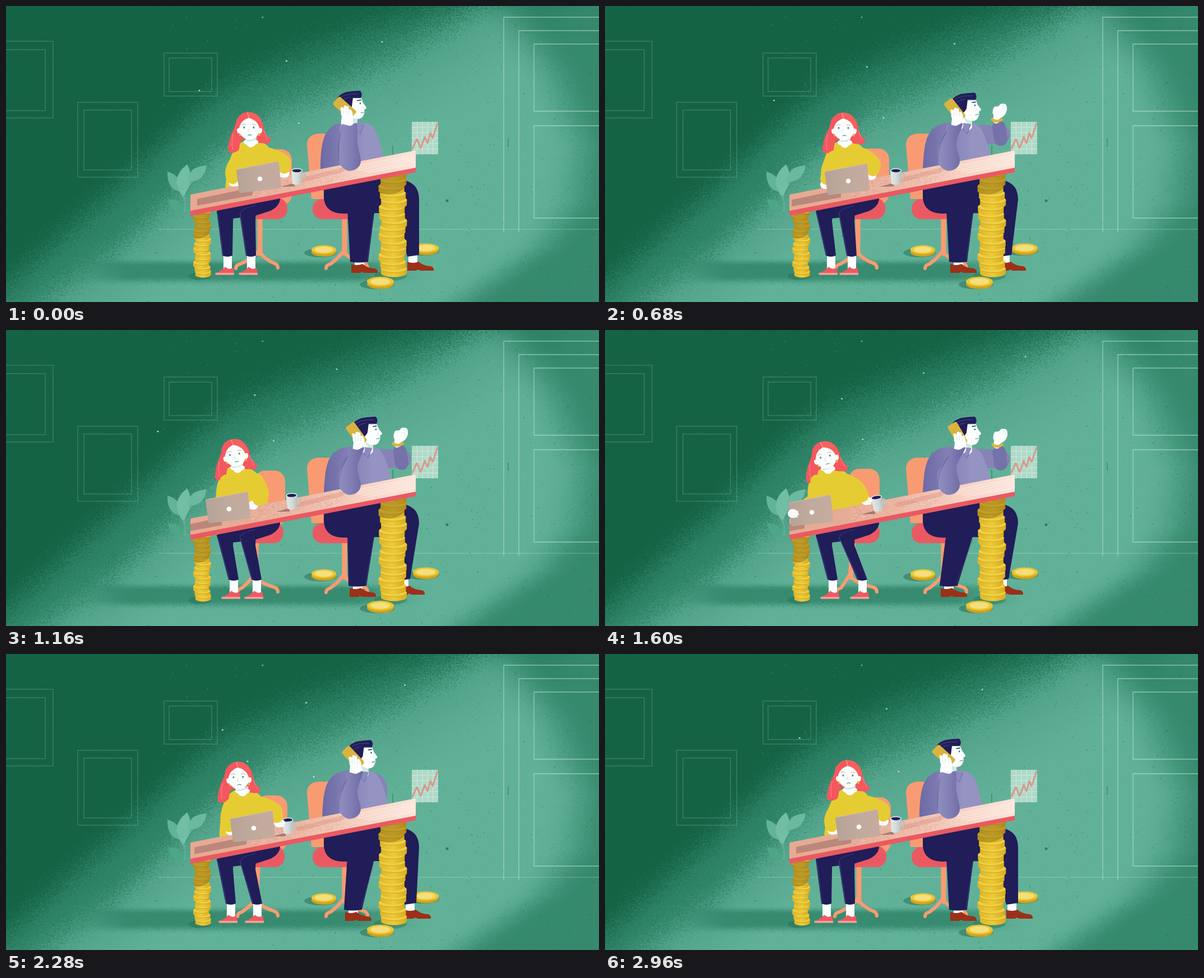
Recreate the animation shown at these times as an HTML page with a canvas. Size 1058 px wide and 529 px high, loop 3 s.

```html
<!DOCTYPE html>
<html lang="en">
<head>
<meta charset="utf-8">
<title>Tilted desk</title>
<style>
html, body { margin: 0; width: 100%; height: 100%; overflow: hidden; background: #2e8266; }
canvas { display: block; width: 100vw; height: 100vh; }
</style>
</head>
<body>
<canvas id="stage" width="1058" height="529"></canvas>
<script>
const W = 1058, H = 529, LOOP = 3000, STEP = 40;
const stage = document.getElementById('stage').getContext('2d');
let c = stage;

const NAVY = '#201d59', ORANGE = '#f99b72', RED = '#ea5962', HAIR = '#f4575f',
  YELLOW = '#e6cc33', WHITE = '#fcfefe', SKIN_SHADE = '#cfeae4';

let seed = 7;
const rand = () => (seed = (seed * 16807) % 2147483647) / 2147483647;
const noise = () => rand() + rand() - 1;
const mix = (a, b, k) => a + (b - a) * k;
const smooth = (a, b, v) => {
  const k = Math.min(1, Math.max(0, (v - a) / (b - a)));
  return k * k * (3 - 2 * k);
};
// Piecewise linear curve; each row is [input, output...]
const along = (rows, v, col = 1) => {
  let i = 1;
  while (i < rows.length - 1 && v > rows[i][0]) i++;
  const [a, b] = [rows[i - 1], rows[i]];
  return mix(a[col], b[col], (v - a[0]) / (b[0] - a[0]));
};

// ---- drawing helpers ----
function fill(color) { c.fillStyle = color; c.fill(); }
function shape(d, color) { c.fillStyle = color; c.fill(new Path2D(d)); }
function line(d, color, width = 1) {
  c.strokeStyle = color; c.lineWidth = width;
  c.lineCap = c.lineJoin = 'round';
  c.stroke(new Path2D(d));
}
function oval(x, y, rx, ry, color, angle = 0) {
  c.beginPath(); c.ellipse(x, y, rx, ry, angle, 0, 7); fill(color);
}
function box(x, y, w, h, r, color) {
  c.beginPath(); c.roundRect(x, y, w, h, r); fill(color);
}
function blob(p, color) {
  const n = p.length, at = i => p[(i + n) % n];
  c.beginPath(); c.moveTo(...p[0]);
  for (let i = 0; i < n; i++) {
    const [a, b, d, e] = [at(i - 1), at(i), at(i + 1), at(i + 2)];
    c.bezierCurveTo(b[0] + (d[0] - a[0]) / 6, b[1] + (d[1] - a[1]) / 6,
      d[0] - (e[0] - b[0]) / 6, d[1] - (e[1] - b[1]) / 6, d[0], d[1]);
  }
  fill(color);
}
function shade(x0, y0, x1, y1, ...colors) {
  const g = c.createLinearGradient(x0, y0, x1, y1);
  colors.forEach((color, i) => g.addColorStop(i / (colors.length - 1), color));
  return g;
}
function placed(x, y, angle, draw) {
  c.save(); c.translate(x, y); c.rotate(angle); draw(); c.restore();
}
function clipped(d, draw) {
  c.save(); c.clip(new Path2D(d)); draw(); c.restore();
}
function layer(draw) {
  const canvas = document.createElement('canvas');
  canvas.width = W; canvas.height = H;
  c = canvas.getContext('2d'); draw(); c = stage;
  return canvas;
}

// ---- scenery ----
const darkEdge = [[0, 500], [100, 412], [200, 325], [330, 200], [400, 145], [500, 100], [640, 45], [790, -8], [1058, -95]];
const lightEdge = [[0, 575], [100, 500], [190, 440], [270, 365], [330, 303], [390, 250], [470, 192], [560, 152], [700, 85], [800, 28], [860, -10], [1058, -140]];
const rightEdge = [[0, 885], [120, 965], [250, 1020], [350, 1005], [430, 945], [529, 800]];
const tones = [[0, 21, 99, 69], [1, 46, 130, 102], [2, 97, 177, 152]];

function paintWall() {
  const img = c.createImageData(W, H);
  for (let x = 0; x < W; x++) {
    const dark = along(darkEdge, x), light = along(lightEdge, x);
    for (let y = 0; y < H; y++) {
      const n = noise();
      let tone = smooth(-45, 45, y - dark + n * 36)
        + .72 * smooth(-36, 40, y - light + n * 42) + .28 * smooth(0, 180, y - light);
      tone -= .85 * smooth(-55, 70, x - along(rightEdge, y) + n * 24);
      const floor = smooth(120, 220, x + n * 30) * (1 - smooth(600, 760, x))
        * smooth(450, 464, y + n * 4) * (1 - smooth(482, 500, y + n * 4));
      tone = Math.max(0, mix(tone, 1.1, floor * .9));
      const i = (y * W + x) * 4;
      for (let k = 0; k < 3; k++) img.data[i + k] = along(tones, tone, k + 1) + n * 3;
      img.data[i + 3] = 255;
    }
  }
  c.putImageData(img, 0, 0);
  for (let i = 0; i < 420; i++) {
    const x = 250 + rand() * 800, y = rand() * H;
    if (y > along(lightEdge, x)) oval(x, y, .5 + rand() * .7, .5 + rand() * .6, 'rgba(25,95,72,.5)');
  }
  for (let i = 0; i < 70; i++)
    oval(270 + rand() * 500, 15 + rand() * 400, .6, .6, 'rgba(205,235,222,.5)');
  oval(787, 348, 2.5, 2.5, '#2d7c62');
  oval(458, 20, 1.6, 1.6, '#5fa58c');
}

function paintFrames() {
  c.strokeStyle = 'rgba(185,225,208,.27)'; c.lineWidth = 1.2;
  [[-5, 63, 89, 137], [-5, 78, 75, 109], [282, 84, 95, 77], [291, 93, 76, 60],
    [128, 172, 107, 134], [139, 186, 85, 107]].forEach(r => c.strokeRect(...r));
  line('M888 403V20H1058M915 403V44H1058M1058 68H942V188H1058M1058 214H942V379H1058', 'rgba(205,238,224,.55)', 1.3);
  line('M270 399H1058', 'rgba(200,235,220,.38)');
  line('M896 237v14M690 250v18', 'rgba(25,95,72,.6)', 1.2);
}

function paintChart() {
  box(724, 207, 47, 58, 0, '#b0d9c8');
  let grid = '';
  for (let i = 1; i < 5; i++) grid += `M${724 + i * 9.4} 207v58`;
  for (let i = 1; i < 6; i++) grid += `M724 ${207 + i * 9.7}h47`;
  line(grid, '#d2ebe0', .9);
  line('M725 255L733 238L740 254L747 234L752 245L757 227L761 236L770 210', '#d9998b', 3);
}

function paintPlant() {
  line('M322 290Q317 330 320 366M320 330Q334 312 350 292M318 345Q308 328 296 305M319 366L300 352', '#69b79d', 1.3);
  shape('M288 296Q314 303 314 332Q287 330 288 296Z', '#62b398');
  shape('M323 283Q339 310 316 341Q290 309 323 283Z', '#71bea4');
  shape('M358 285Q353 316 324 314Q326 286 358 285Z', '#6bbaa0');
  shape('M290 346Q312 344 317 367Q292 371 290 346Z', '#4da688');
}

function floorCoin(x, y, r) {
  oval(x - 6, y + 4, r + 7, 8, 'rgba(28,100,76,.45)');
  oval(x, y + 2.5, r, r * .38, '#d5a319');
  oval(x, y - 1.5, r, r * .36, '#eac633');
  oval(x, y - 1.5, r * .74, r * .25, '#f4df7d');
}

function chairBase(top, foot, left, right) {
  line(`M${top} 376L${foot} 442`, ORANGE, 9);
  line(`M${foot} 434Q${foot - 8} 449 ${left + 8} 461Q${left} 463 ${left} 469M${foot} 440Q${foot + 8} 452 ${right - 8} 459Q${right} 461 ${right} 468`, ORANGE, 6);
}

function paintManChair() {
  chairBase(604, 604, 571, 645);
  box(547, 345, 90, 36, 17, RED);
  shape('M537 248Q537 228 562 228L590 228V345H545Z', ORANGE);
}

const scenery = layer(() => {
  paintWall(); paintFrames(); paintChart(); paintPlant();
  floorCoin(567, 437, 22); floorCoin(749, 434, 23);
  paintManChair();
});

function stack(x, top, bottom, count, rx, ry, wobble) {
  oval(x - 4, bottom - 2, rx + 6, ry + 2, 'rgba(28,100,76,.35)');
  const gap = (bottom - top) / count;
  for (let i = 0; i < count; i++) {
    const y = bottom - ry - gap * i - gap * .6, cx = x + Math.sin(i * 1.9 + 1) * wobble;
    c.beginPath();
    c.ellipse(cx, y, rx, ry, 0, Math.PI, 0);
    c.ellipse(cx, y + gap * .65, rx, ry, 0, 0, Math.PI);
    fill(shade(cx - rx, 0, cx + rx, 0, '#deb529', '#edca37', '#daab20'));
    oval(cx, y, rx, ry, '#ecd044');
    line(`M${cx - rx} ${y}A${rx} ${ry} 0 0 0 ${cx + rx} ${y}`, '#cd9f20', .9);
  }
}
const stacks = layer(() => {
  stack(350, 369, 485, 14, 14, 5, 2);
  stack(690, 300, 484, 15, 23, 7, 2.4);
  floorCoin(668, 494, 24);
  c.globalCompositeOperation = 'source-atop';
  shape('M334 370H368V404Q350 420 334 414Z', 'rgba(120,85,10,.4)');
  shape('M664 298H717V316Q700 345 664 334Z', 'rgba(120,85,10,.4)');
});

const deskY = x => 337 - (x - 329) * .1965;
const ABOVE_DESK = 'M0 0H1058V220L329 360L0 425Z';
const desk = layer(() => {
  shape('M329 337L731 258V290L329 367Z',
    shade(329, 0, 731, 0, '#e6aa92', '#e6ab95', '#ebb8a4', '#f6d1c2', '#fce5da'));
  shape('M329 366L731 289V297L329 375Z', RED);
  for (let i = 0; i < 900; i++) {
    const x = 440 + rand() * 170;
    oval(x, deskY(x) + 2 + rand() * 25, .7, .6, i % 2 ? 'rgba(250,222,210,.6)' : 'rgba(214,132,116,.4)');
  }
  for (let i = 0; i < 5; i++) {
    const x = 610 + i * 9, y = deskY(x) + 7 + i * 4;
    line(`M${x} ${y}L731 ${y - (731 - x) * .19}`, 'rgba(255,246,241,.6)', 1.4);
  }
  line('M520 313L600 293', 'rgba(205,110,98,.25)', 8);
});

// ---- motion: values at the key times, joined by monotone curves that wrap ----
const TIMES = [0, 680, 1160, 1600, 1920, 2280];
const tracks = {
  laptop: [0, -19, -55, -84, -54, -11],
  cupX: [0, 0, -9, -33, -32, -16],
  cupTilt: [0, 0, 2, 9, 8, 3],
  faceX: [434, 426, 409, 394, 393, 415],
  faceY: [220, 221, 225, 229, 229, 223],
  headTilt: [0, 0, -9, -13, -13, -2],
  collarX: [437, 428, 413, 398, 399, 422],
  chair: [0, -3, -12, -20, -20, -8],
  shoeL: [374, 382, 385, 385, 385, 380],
  shoeR: [416, 419, 426, 438, 440, 427],
  elbowRX: [496, 480, 457, 455, 455, 481],
  elbowRY: [282, 287, 297, 292, 292, 284],
  handRX: [497, 475, 441, 466, 466, 487],
  handRY: [299, 303, 313, 305, 305, 302],
  elbowLX: [403, 397, 391, 376, 375, 396],
  handLX: [406, 393, 384, 335, 363, 401],
  handLY: [315, 319, 320, 328, 323, 316],
  turn: [0, 1, 1, 1, 1, .7],
  lean: [0, 1, 1, 1, 1, .55],
  phoneX: [604, 624, 625, 629, 622, 619],
  phoneTilt: [42, 52, 54, 60, 48, 47],
  armX: [648, 706, 706, 706, 703, 660],
  armY: [285, 238, 238, 239, 249, 285],
  fistX: [650, 704, 704, 705, 707, 664],
  fistY: [310, 188, 188, 190, 220, 310],
  nearFoot: [616, 616, 613, 599, 597, 605],
  farFoot: [716, 704, 700, 699, 703, 711]
};
function valueAt(v, t) {
  const n = TIMES.length;
  const time = i => TIMES[(i + n) % n] + LOOP * Math.floor(i / n);
  const val = i => v[(i + n) % n];
  const slope = i => (val(i + 1) - val(i)) / (time(i + 1) - time(i));
  const tangent = i => {
    const a = slope(i - 1), b = slope(i);
    return a * b <= 0 ? 0 : 2 * a * b / (a + b);
  };
  let i = n - 1;
  while (TIMES[i] > t) i--;
  const span = time(i + 1) - time(i), k = (t - time(i)) / span, m = 1 - k;
  return val(i) * (1 + 2 * k) * m * m + val(i + 1) * k * k * (3 - 2 * k)
    + span * (tangent(i) * k * m * m - tangent(i + 1) * k * k * m);
}

// ---- man ----
function manShoe(x, y) {
  shape(`M${x} ${y}Q${x + 10} ${y + 4} ${x + 20} ${y}Q${x + 30} ${y + 8} ${x + 42} ${y + 8}Q${x + 48} ${y + 10} ${x + 47} ${y + 16}H${x + 24}L${x + 18} ${y + 14}L${x + 16} ${y + 16}H${x}Z`, '#9c3018');
}

function manLegs(p) {
  const far = p.farFoot, near = p.nearFoot;
  box(far + 2, 440, 16, 22, 3, WHITE);
  manShoe(far, 457);
  shape(`M660 312H712Q737 318 737 346L${far + 21} 445L${far} 448L690 350Z`, NAVY);
  box(near + 6, 452, 17, 14, 3, WHITE);
  manShoe(near, 461);
  shape('M567 322V340C567 360 580 371 602 371L668 370L700 295Z', NAVY);
  shape(`M609 362H658L${near + 30} 457Q${near + 12} 460 ${near - 2} 457Z`, NAVY);
  line(`M656 374L${near + 29} 452`, 'rgba(80,78,140,.35)', 2);
}

function manArm(p) {
  const sx = mix(640, 670, p.lean);
  line(`M${sx} 229Q${sx + 22 * p.lean} 231 ${p.armX} ${p.armY - 8}`, '#8783b6', 33);
  const wx = mix(p.fistX, p.armX, .42), wy = mix(p.fistY, p.armY, .42);
  line(`M${p.armX} ${p.armY}L${wx - 2} ${wy + 8}`, '#7572aa', 24);
  line(`M${p.fistX - 4} ${p.fistY + 5}L${p.fistX - 6} ${p.fistY + 16}`, WHITE, 12);
  line(`M${p.fistX - 13} ${p.fistY + 15}Q${p.fistX - 5} ${p.fistY + 21} ${p.fistX + 3} ${p.fistY + 15}`, '#d9b63d', 5);
  placed(p.fistX, p.fistY, 0, () => {
    blob([[-12, 5], [-10, -7], [-2, -9], [2, -13], [11, -12], [13, -2], [8, 8], [-3, 13]], WHITE);
    line('M5 -10q4 1 6 4M4 -5q4 0 6 3', SKIN_SHADE, 1);
  });
}

function manTorso(p) {
  const b = p.lean, l = 6 * b, r = 14 * b;
  blob([[610 + r, 207], [582 + l * 1.5, 215], [566 + l * 1.2, 240], [561 + l, 290], [567, 345],
    [677, 330], [674 + r, 275], [664 + r, 235], [652 + r, 214], [630 + r, 207]],
    shade(562 + l, 0, 640 + r, 0, '#6d6aa5', '#827fb5', '#9593c2'));
}

function manHead(p) {
  placed(28 * p.turn, 3.5 * p.turn, 0, () => {
    shape('M600 165H634L637 173L643 181Q643 184 639 185L640 190L637 197Q634 202 627 202L627 213Q620 226 604 212Z', WHITE);
    shape('M612 192Q616 201 627 202L627 212Q615 208 612 192Z', SKIN_SHADE);
    shape('M590 176Q586 161 606 154Q620 151 632 151.5Q637 158 633 164L619 164L617 180Q613 188 604 192Z', NAVY);
    line('M597 163Q608 156 628 157M600 168Q607 163 614 163', '#4c4a86', 1);
    line('M627 169l6 -1', NAVY, 1.4);
    oval(632, 174, 1.2, 1.6, '#1c6a62');
    line('M633 191l6 -1', '#4a8e86', 1.2);
    line('M636 180q-2 3 1 4', SKIN_SHADE, 1);
  });
  const cx = 627 + 14 * p.lean;
  shape(`M${cx - 2} 209L${cx + 12} 211L${cx + 5} 229L${cx - 3} 220L${cx - 9} 227L${cx - 14} 211Z`, '#8d8bbd');
  line(`M${cx - 3} 220L${cx + 5} 229L${cx + 11} 213`, '#6d6aa5', 1);
}

function manPhone(p) {
  const { phoneX: x } = p, y = 182 + 4 * p.turn, top = x + 7 - 8 * p.lean;
  placed(x, y, p.phoneTilt * Math.PI / 180, () => box(-21, -9.5, 42, 19, 4, '#d9b33f'));
  blob([[x - 7, y - 1], [x - 5, y + 13], [x - 5, y + 33], [x + 13, y + 33], [x + 15, y + 18], [x + 13, y + 6], [x + 4, y + 3]], WHITE);
  line(`M${x - 4} ${y + 12}L${x - 4} ${y + 2}M${x + 1} ${y + 12}L${x + 1} ${y - 2}M${x + 6} ${y + 12}L${x + 5} ${y - 1}M${x + 11} ${y + 14}L${x + 10} ${y + 5}`, WHITE, 4.6);
  line(`M${x - 1.5} ${y + 3}v8M${x + 3.5} ${y + 2}v9M${x + 8} ${y + 4}v8`, SKIN_SHADE, .8);
  blob([[top - 13, 212], [top + 3, 214], [top + 15, 211], [627, 245], [633, 277], [625, 291], [609, 294], [595, 281], [594, 255], [top - 16, 230]],
    shade(592, 0, 634, 0, '#918fbf', '#8481b6', '#6f6ca7'));
  line(`M${top - 14} 225Q592 255 594 276`, 'rgba(70,66,130,.3)', 2);
}

// ---- woman ----
function womanShoe(x) {
  box(x + 14, 442, 15, 30, 3, WHITE);
  shape(`M${x} 477Q${x + 12} 473 ${x + 17} 466Q${x + 25} 473 ${x + 31} 467L${x + 33} 477Z`, '#ee5962');
  shape(`M${x - 1} 477H${x + 33}V480.5H${x}Z`, '#f7a29b');
}

function womanLowerBody(p) {
  const s = p.chair;
  chairBase(453 + s * .5, 453 + s * .75, 410 + Math.max(-5, s) * -.6, 485);
  box(455 + s, 256 + s * .4, 55, 100, 19, ORANGE);
  box(425 + s * .6, 343, 77, 38, 18, RED);
  womanShoe(p.shoeL);
  womanShoe(p.shoeR);
  const leg = (x, foot) => {
    shape(`M${x} 367Q${x + 10} 356 ${x + 30} 360L${x + 29} 385L${foot + 30} 446Q${foot + 21} 450 ${foot + 12} 446Z`, NAVY);
    line(`M${x + 2} 372L${foot + 13} 444`, 'rgba(82,80,145,.45)', 2);
  };
  leg(376, p.shoeL);
  shape('M376 366L470 335L489 344Q489 357 472 366L444 375L403 380Z', NAVY);
  leg(416, p.shoeR);
  line('M417 371Q421 361 444 357', 'rgba(90,88,152,.5)', 1.2);
}

function womanTorso(p) {
  const x = p.collarX, y = 247 + (437 - x) * .12, low = (437 - x) * .4;
  blob([[x - 14, y - 5], [x - 32, y + 14], [x - 42 + low * .4, y + 50], [x - 38 + low, y + 92], [x + 38 + low, y + 88],
    [x + 42 + low, y + 42], [x + 38 + low * .3, y + 14], [x + 15, y - 7]], YELLOW);
}

function womanHead(p) {
  const cx = p.collarX, cy = 247 + (437 - cx) * .12, tilt = p.headTilt * Math.PI / 180;
  // Loose hair hangs, so it follows the tilt only in part
  placed(p.faceX, p.faceY, tilt * .35, () => {
    blob([[-3, -30], [12, -27], [23, -14], [27, 2], [33, 13], [38, 17], [35, 25], [20, 25], [-12, 19],
      [-20, 39], [-37, 40], [-35, 18], [-26, -4], [-20, -21]], HAIR);
    line('M-29 8Q-32 24 -30 36M26 2Q30 12 33 19', '#fb8580', 1);
  });
  line(`M${p.faceX + 2} ${p.faceY + 15}L${cx} ${cy - 3}`, WHITE, 17);
  oval(cx, cy - 4, 13, 6, WHITE);
  line(`M${p.faceX - 4} ${p.faceY + 20}Q${cx + 4} ${cy - 5} ${cx + 9} ${cy - 11}`, SKIN_SHADE, 3);
  placed(p.faceX, p.faceY, tilt, () => {
    oval(-18, 2, 4, 6, WHITE); oval(19, 2, 4, 6, WHITE);
    oval(-16, 10, 2, 2.3, '#e3b932'); oval(18, 10, 2, 2.3, '#e3b932');
    blob([[-18, -8], [-16, 8], [-9, 16], [0, 19], [10, 16], [17, 7], [18, -8], [0, -25]], WHITE);
    shape('M-4 -30.5Q-24 -28 -23 0L-18 -2Q-15 -16 -1 -20Z', HAIR);
    shape('M-4 -30.5Q21 -32 24 -1L18 -2Q15 -16 -1 -20Z', '#f6605f');
    line('M-3 -29L-1 -21', '#fb9478', 1.6);
    line('M-13 -8q4 -2 7 -.5M5 -8.5q4 -1 7 1', '#e2a194', 1);
    oval(-9, -3, 1.6, 1.9, '#5d988d'); oval(8, -3, 1.6, 1.9, '#5d988d');
    line('M-1 -1q-3 6 1 6', '#bfdfd8', 1);
    line('M-2 11q3 -1.5 6 0', '#5d9c92', 1.3);
  });
}

function sleeve(x, y, ex, ey, hx, hy) {
  line(`M${x} ${y}Q${ex + (ex - x) * .2} ${mix(y, ey, .6)} ${ex} ${ey}L${mix(ex, hx, .35)} ${mix(ey, hy, .35)}`, YELLOW, 23);
}
function hand(x, y, side) {
  oval(x, y, 9, 8, WHITE);
  line(`M${x} ${y - 3}h${side * 8}M${x} ${y + 1}h${side * 9}M${x} ${y + 5}h${side * 7}`, WHITE, 4);
  line(`M${x + side * 2} ${y - 1}h${side * 6}M${x + side * 2} ${y + 3}h${side * 6}`, SKIN_SHADE, .7);
}

function deskShadows(p) {
  clipped('M329 337L731 258V289L329 366Z', () => {
    const x0 = 341 + p.laptop * .42, x1 = 440 + p.laptop, cx = 490 + p.cupX;
    shape(`M${x0} ${deskY(x0) + 10}L${x1} ${deskY(x1) + 9}V${deskY(x1) + 23}L${x0} ${deskY(x0) + 22}Z`, 'rgba(140,96,96,.48)');
    shape(`M${cx} ${deskY(cx) + 18}L${cx + 25} ${deskY(cx) + 11}V${deskY(cx) + 17}Z`, 'rgba(120,80,78,.6)');
  });
}

function laptop(p) {
  placed(p.laptop, -p.laptop * .2, 0, () => {
    shape('M413 292L484 278Q486 278 487 280L491 323Q491 325 489 326L419 334Q416 334 416 332L411 295Q411 292 413 292Z',
      shade(411, 0, 491, 0, '#b5a296', '#c0aa9d', '#c6ab9f'));
    line('M413 292L485 278', '#d0bcb0', 1);
    oval(453, 309, 4.3, 4.3, WHITE);
  });
}

function cup(p, t) {
  placed(519 + p.cupX, 305 - p.cupX * .15, -p.cupTilt * Math.PI / 180, () => {
    line('M9 -6Q16 -7 14 1Q12 6 8 5', '#b7c4c2', 2.6);
    shape('M-10 -11H10L8 12Q0 17 -8 13Z', shade(-10, 0, 10, 0, '#e4e8e6', '#d5dcda', '#b4c1bf'));
    oval(0, -11, 10, 4, '#edf0ee');
    oval(0, -10.7, 8.4, 2.9, NAVY);
    const k = (t - 1640) / 480, hop = 44 * k * (1 - k);
    if (k > 0 && k < 1) {
      oval(-6 - 8 * k, -10 - hop, 1.7, 1.4, NAVY);
      oval(-4 - 4 * k, -10 - hop * 1.2, 1.2, 1.2, NAVY);
    }
  });
}

// ---- drifting dust: [seconds, x, y] ----
const dustPaths = [
  [[1.3, 767, 44], [3, 671, 64], [4.16, 590, 70], [7.92, 407, 128], [9, 345, 151], [10.3, 262, 185]],
  [[2.1, 556, 222], [3.68, 497, 200], [4.92, 447, 194], [5.3, 430, 192]]
];
function dust(t) {
  for (const rows of dustPaths) {
    const end = rows[rows.length - 1][0];
    for (let s = t / 1000; s < end; s += LOOP / 1000)
      if (s > rows[0][0]) oval(along(rows, s), along(rows, s, 2), 1.6, 1.3, 'rgba(230,248,240,.75)');
  }
}

function render(t) {
  const p = {};
  for (const name in tracks) p[name] = valueAt(tracks[name], t);
  const lean = 437 - p.collarX, grabbing = t > 1350 && t < 2150;

  c.drawImage(scenery, 0, 0);
  dust(t);
  manLegs(p);
  womanLowerBody(p);
  c.drawImage(stacks, 0, 0);
  clipped(ABOVE_DESK, () => {
    manArm(p);
    manTorso(p);
    manHead(p);
    womanTorso(p);
    womanHead(p);
  });
  c.drawImage(desk, 0, 0);
  deskShadows(p);
  manPhone(p);
  cup(p, t);
  hand(p.handRX, p.handRY, p.handRX > p.elbowRX + 4 ? 1 : -1);
  sleeve(p.collarX + 33, 265 + lean * .1, p.elbowRX, p.elbowRY, p.handRX, p.handRY);
  if (!grabbing) hand(p.handLX, p.handLY, 1);
  sleeve(p.collarX - 20, 270, p.elbowLX, 302, p.handLX, p.handLY);
  laptop(p);
  if (grabbing) hand(p.handLX, p.handLY, 1);
}

const start = performance.now();
function tick() {
  const t = (performance.now() - start) % LOOP;
  render(Math.floor(t / STEP) * STEP);
  requestAnimationFrame(tick);
}
tick();
</script>
</body>
</html>
```
